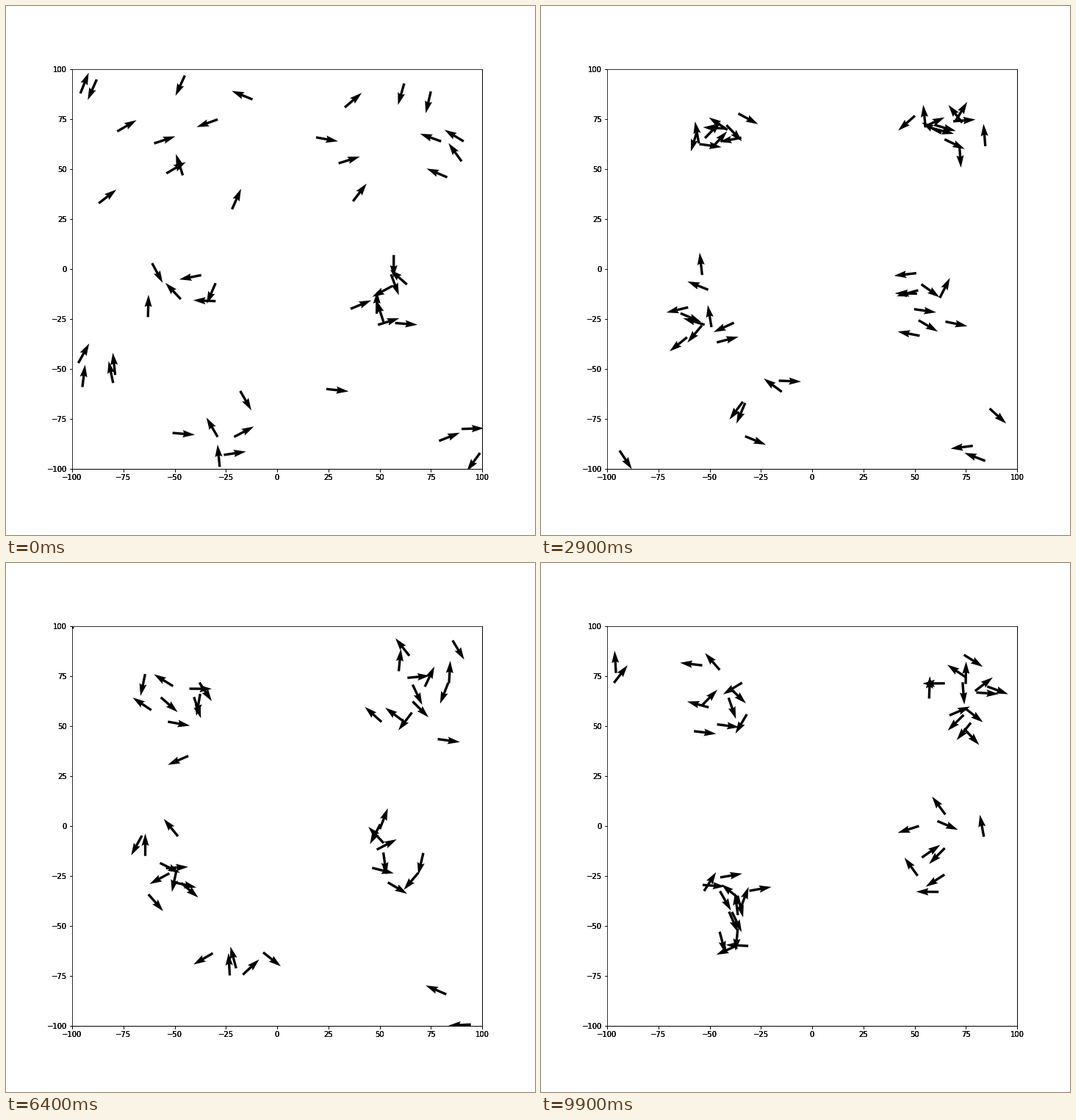
Animation of 720x720 px, one loop 10000 ms. Source, as a matplotlib script:

```python
import numpy as np
import matplotlib.pyplot as plt
from matplotlib.animation import FuncAnimation

FRAMES = 100
SPEED = 3.2
HALF = 100
rng = np.random.default_rng(7)

# Start points of the agents, one row per flock.
UPPER_LEFT = [(-88, 95), (-78, 69), (-87, 33), (-60, 63), (-54, 48),
              (-46, 47), (-45, 97), (-29, 75), (-12, 85), (-22, 30)]
UPPER_RIGHT = [(33, 81), (62, 93), (75, 89), (80, 64), (91, 64), (90, 54),
               (83, 46), (19, 66), (30, 53), (37, 34), (24, -60), (-26, -93)]
LEFT = [(-61, 3), (-37, -3), (-47, -15), (-63, -24), (-30, -7),
        (-30, -16), (-97, -47), (-95, -59), (-79, -53), (-80, -57)]
BOTTOM = [(-51, -82), (-29, -84), (-21, -84), (-18, -61), (-28, -99)]
CORNER = [(79, -86), (90, -80), (99, -92), (-96, 88)]
RIGHT = rng.normal((56, -13), 15, (9, 2))

MERGED = (-38, -42)
# Start points, centre, and centre after the late drift.
FLOCKS = [
    (UPPER_LEFT, (-45, 67), (-45, 67)),
    (UPPER_RIGHT, (65, 69), (70, 65)),
    (LEFT, (-57, -18), MERGED),
    (BOTTOM, (-20, -73), MERGED),
    (CORNER, (91, -90), (90, -125)),
    (RIGHT, (57, -12), (62, -13)),
]


def spread(k):
    return np.array([f[k] for f in FLOCKS for _ in f[0]])


def wrap(d, half):
    return (d + half) % (half + half) - half


def simulate():
    pos = np.vstack([f[0] for f in FLOCKS]).astype(float)
    n = len(pos)
    home, late = spread(1), spread(2)
    offset = rng.normal(0, 4, pos.shape)
    turn = rng.uniform(0.25, 0.5, n)

    def aim(target):
        dx, dy = wrap(target - pos, HALF).T
        return np.arctan2(dy, dx)

    head = aim(home) + rng.normal(0, 0.8, n)
    steps = []
    for i in range(FRAMES):
        steps.append((pos, head))
        drift = np.interp(i, (55, FRAMES), (0, 1))
        bend = wrap(aim(home + drift * (late - home) + offset) - head, np.pi)
        head = head + np.clip(bend, -turn, turn) + rng.normal(0, 0.12, n)
        move = np.column_stack([np.cos(head), np.sin(head)])
        pos = wrap(pos + SPEED * move, HALF)
    return steps


STEPS = simulate()

fig = plt.figure(figsize=(10, 10), dpi=72, facecolor="white")
fig.subplots_adjust(left=0.125, right=0.9, bottom=0.125, top=0.88)
ticks = np.arange(-HALF, HALF + 1, 25)
# Stacked axes give the heavy tick labels.
for _ in range(3):
    ax = fig.add_subplot()
    ax.set(xticks=ticks, yticks=ticks, xlim=(-HALF, HALF), ylim=(-HALF, HALF))

pos, head = STEPS[0]
arrows = ax.quiver(*pos.T, np.cos(head), np.sin(head), color="black",
                   scale=18.3, scale_units="width", units="width", width=0.006)
ax.set(xlim=(-HALF, HALF), ylim=(-HALF, HALF))


def update(i):
    pos, head = STEPS[i]
    arrows.set_offsets(pos)
    arrows.set_UVC(np.cos(head), np.sin(head))
    return arrows,


anim = FuncAnimation(fig, update, frames=FRAMES, interval=100, repeat=True)
plt.show()
```
